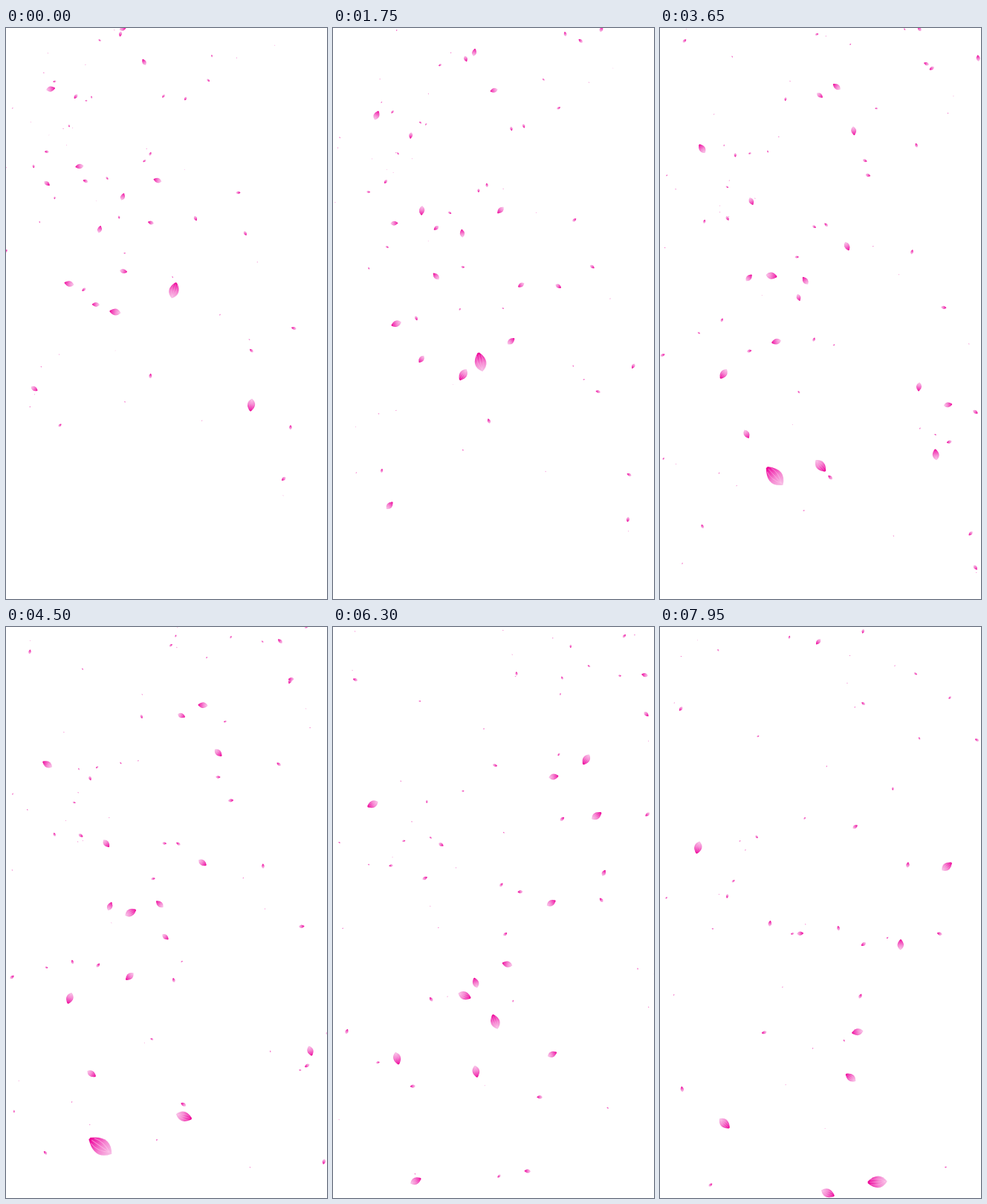
Animation of 432x768 px, one loop 8000 ms. Source, as an HTML page with a canvas:

```html
<!DOCTYPE html>
<html lang="en">
<head>
<meta charset="utf-8">
<title>Falling petals</title>
<style>
  html, body { margin: 0; width: 100%; height: 100%; overflow: hidden; background: #fff; }
  canvas { display: block; width: 432px; height: 768px; }
</style>
</head>
<body>
<canvas id="stage" width="432" height="768"></canvas>
<script>
const W = 432, H = 768, LOOP = 8000, STEP = 50, FALL = 16;
const ctx = document.getElementById('stage').getContext('2d');

function randomFrom(seed) {
  return () => {
    seed = (seed + 0x6D2B79F5) | 0;
    let n = Math.imul(seed ^ (seed >>> 15), 1 | seed);
    n = (n + Math.imul(n ^ (n >>> 7), 61 | n)) ^ n;
    return ((n ^ (n >>> 14)) >>> 0) / 4294967296;
  };
}
const random = randomFrom(27);
const between = (a, b) => a + (b - a) * random();

// Near petals: start x, start y, sideways drift, approach rate (per 1000 s), length
const near = [
  [226, 353, -33, 87, 22], [147, 382, 4, 69, 15], [85, 344, -3, 37, 13],
  [60, 82, -3, 37, 12], [99, 186, 3, 73, 11], [126, 271, -1, 60, 10],
  [186, 46, 3, 67, 9], [157, 1, 6, 68, 9], [154, 8, 1, 73, 7],
  [157, 227, 2, 44, 10], [158, 327, 25, 90, 10], [38, 485, 13, 115, 10],
  [121, 372, -8, 58, 10], [55, 209, 11, 56, 9], [204, 205, 6, 28, 11],
  [107, 206, 8, 74, 7], [195, 262, 10, 92, 8], [255, 256, -4, 104, 7],
  [94, 92, -4, 97, 7], [330, 507, 19, 103, 17]
].map(([x, y, drift, rate, size]) => ({ x, y, drift, rate: rate / 1000, size }));

// Far petals are scattered around their place halfway through the loop
const far = Array.from({ length: 108 }, () => {
  const rate = between(0.015, 0.075), drift = between(-6, 8), depth = 1 - 4 * rate;
  return {
    x: between(-60, 460) * depth - 4 * drift,
    y: (-130 + 880 * random() ** 1.35) * depth - 4 * FALL,
    drift, rate,
    size: 1 + 6 * random() ** 1.4
  };
});

const petals = [...far, ...near];
for (const p of petals) {
  p.angle = between(0, 2 * Math.PI);
  p.spin = -between(0.25, 0.8);
}

// Unit petal: one long, pale end at the left and dark tip at the right
const shape = new Path2D('M-.5 0Q-.1 -.5 .5 -.04V.04Q-.1 .5 -.5 0Z');
const veins = new Path2D('M-.4 0Q0 -.2 .36 -.1M-.4 0H.4M-.4 0Q0 .2 .36 .1');
const tint = ctx.createLinearGradient(-0.5, 0, 0.5, 0);
tint.addColorStop(0, '#f8c4e8');
tint.addColorStop(0.45, '#f584d0');
tint.addColorStop(0.8, '#f02cae');
tint.addColorStop(1, '#ee0092');

function drawPetal(p, t) {
  const depth = 1 - p.rate * t;
  if (depth < 0.05) return;
  const x = (p.x + p.drift * t) / depth, y = (p.y + FALL * t) / depth;
  const size = p.size / depth;
  if (x < -size || x > W + size || y < -size || y > H + size) return;
  ctx.save();
  ctx.translate(x, y);
  ctx.rotate(p.angle + p.spin * t);
  ctx.scale(size, size * 1.15);
  ctx.fillStyle = tint;
  ctx.fill(shape);
  if (size > 9) {
    ctx.lineWidth = 0.025;
    ctx.strokeStyle = 'rgba(255,205,238,.55)';
    ctx.stroke(veins);
  }
  ctx.restore();
}

function frame() {
  const ms = performance.now() % LOOP;
  const t = Math.floor(ms / STEP) * STEP / 1000;
  ctx.fillStyle = '#fff';
  ctx.fillRect(0, 0, W, H);
  for (const p of petals) drawPetal(p, t);
  requestAnimationFrame(frame);
}
frame();
</script>
</body>
</html>
```
